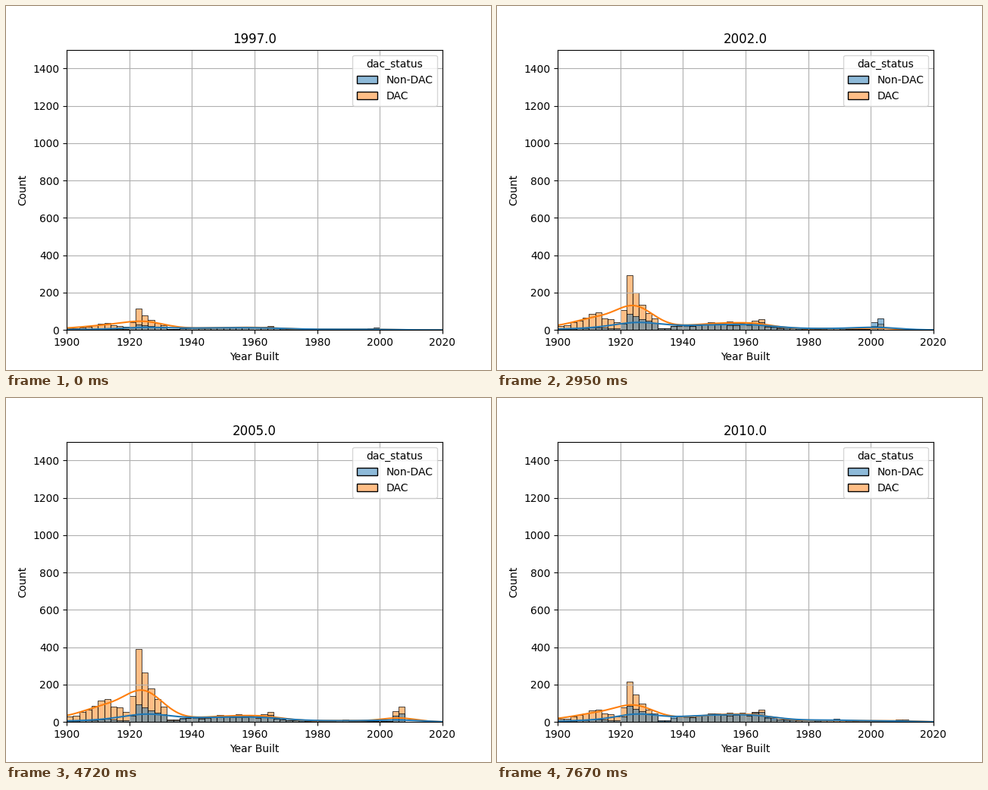
A matplotlib script for the animation above (8 s loop, 640 by 480 pixels).

```python
import numpy as np
import matplotlib.pyplot as plt
from matplotlib.animation import FuncAnimation
from matplotlib.patches import Patch

STEP_MS, TICK_MS, LOOP_MS = 590, 40, 8000
FIRST_YEAR = 1997
BLUE, ORANGE = "#1f77b4", "#ff7f0e"
WIDTH = 2
LEFT = np.arange(1884, 2020, WIDTH)
KEY_YEARS = [1997, 1999, 2001, 2003, 2005, 2007, 2010]


def bump(x, center, spread):
    return np.exp(-((x - center) / spread) ** 2 / 2)


def make_profile(early, boom, decay, slump, postwar, sixties, seed):
    """Building stock by construction era, with seeded unevenness outside the boom."""
    b = LEFT
    eras = [
        (b < 1920, early[0] + early[1] * bump(b, 1911, 4.5)),
        (b < 1922, 0.36 * boom),
        (b < 1932, boom * np.exp(-(b - 1922) / decay)),
        (b < 1936, slump),
        (b < 1962, postwar[0] + postwar[1] * bump(b, 1954, 9)),
        (b < 1966, sixties),
        (b >= 1966, 5 + 14 * np.exp(-(b - 1966) / 6) + 9 * bump(b, 1987, 1.5)),
    ]
    profile = np.select([test for test, _ in eras], [value for _, value in eras])
    noise = np.random.default_rng(seed).uniform(0.8, 1.2, len(b))
    calm = ((b >= 1920) & (b < 1932)) | (b < 1900)
    return profile * np.where(calm, 1, noise)


# "old" and "new" are sales levels of buildings from before and after 1936;
# "fresh" is the height, centre and spread of sales of brand-new buildings.
dac = dict(
    color=ORANGE,
    profile=make_profile((18, 75), 345, 5.2, 10, (18, 22), 57, seed=4),
    old=[.33, .41, .70, 1, 1.13, .93, .62],
    new=[.35, .6, .75, 1.15, .85, 1.15, 1.05],
    fresh=(70, 2005.2, 2.1),
)
non_dac = dict(
    color=BLUE,
    profile=make_profile((4, 9), 90, 10, 8, (20, 14), 45, seed=9),
    old=[.35, .5, .85, 1.1, 1.03, .92, .95],
    new=[.4, .9, .85, 1.05, .87, .95, 1.25],
    fresh=(55, 2003, 2.2),
)


def heights(group, year):
    """Bar heights of one group, ending with two bins of brand-new buildings."""
    old, new = (np.interp(year, KEY_YEARS, group[k]) for k in ("old", "new"))
    row = group["profile"] * np.where(LEFT < 1936, old, new)
    last = (2 * ((year + 1) // 2) - LEFT[0]) // WIDTH
    peak, center, spread = group["fresh"]
    row[last] = 10 + peak * bump(year, center, spread)
    row[last - 1] = 0.7 * row[last]
    row[last + 1:] = 0
    return np.round(row)


def kde(counts, x):
    """Gaussian density with Scott's bandwidth, scaled to counts."""
    mid = LEFT + WIDTH / 2
    total = counts.sum()
    mean = (counts * mid).sum() / total
    sigma = np.sqrt((counts * (mid - mean) ** 2).sum() / total)
    band = sigma * total ** -0.2
    weights = bump(x[:, None], mid, band)
    return WIDTH * (weights @ counts) / (band * np.sqrt(2 * np.pi))


fig, ax = plt.subplots(figsize=(6.4, 4.8), dpi=100)
shown = LEFT >= 1900
years = np.linspace(1890, 2020, 200)
for group in (dac, non_dac):
    group["bars"] = ax.bar(LEFT[shown], np.zeros(shown.sum()), WIDTH, align="edge",
                           facecolor=(group["color"], 0.5), edgecolor="black", lw=0.5)
    group["line"], = ax.plot([], [], color=group["color"], lw=1.5)

ax.set(xlim=(1900, 2020), ylim=(0, 1500), xlabel="Year Built", ylabel="Count")
ax.grid(True)
title = ax.set_title("")
ax.legend(handles=[Patch(facecolor=(c, 0.5), edgecolor="black", label=name)
                   for c, name in ((BLUE, "Non-DAC"), (ORANGE, "DAC"))],
          title="dac_status", loc="upper right")


def update(tick):
    year = FIRST_YEAR + (tick * TICK_MS + TICK_MS - 1) // STEP_MS
    title.set_text(f"{year:.1f}")
    for group in (dac, non_dac):
        counts = heights(group, year)
        for bar, count in zip(group["bars"], counts[shown]):
            bar.set_height(count)
        group["line"].set_data(years, kde(counts, years))
    return []


anim = FuncAnimation(fig, update, frames=LOOP_MS // TICK_MS, interval=TICK_MS,
                     repeat=True, repeat_delay=0)
plt.show()
```
